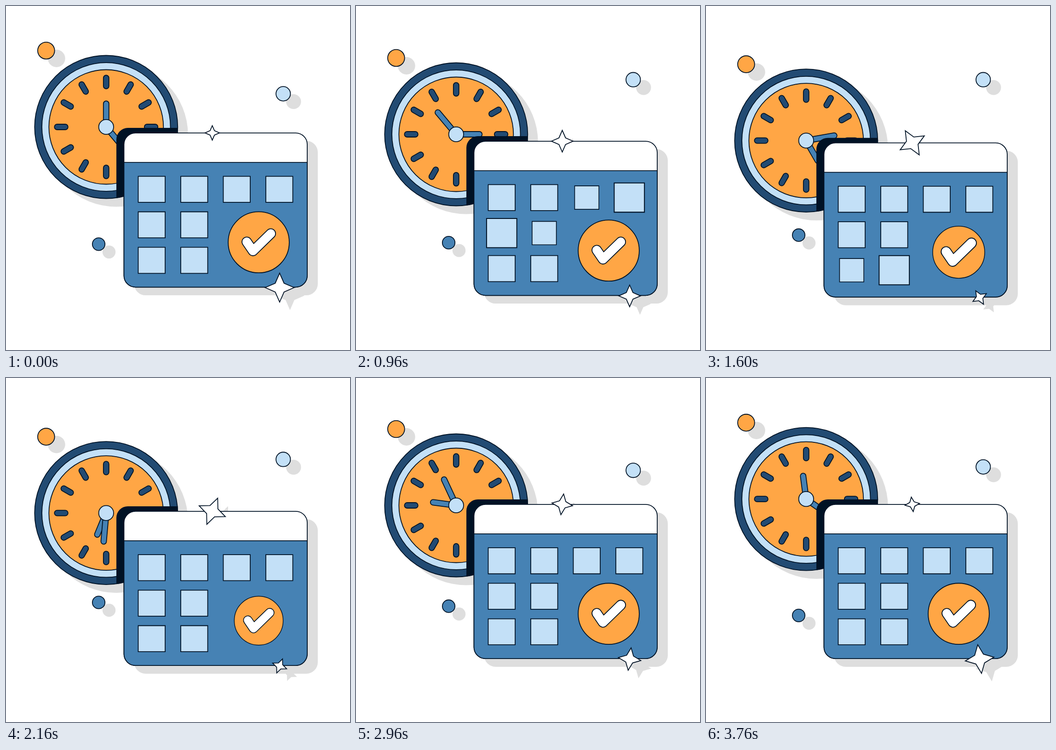
Write an HTML page with a canvas that moves like this. It is 748x748 px and loops after 3840 ms.

```html
<!DOCTYPE html>
<html lang="en">
<head>
<meta charset="utf-8">
<title>Clock and calendar</title>
<style>
  html, body { margin: 0; width: 100%; height: 100%; overflow: hidden; background: #fff; }
  canvas { display: block; }
</style>
</head>
<body>
<canvas id="stage" width="748" height="748"></canvas>
<script>
const ctx = document.getElementById('stage').getContext('2d');
const LOOP = 3840, STEP = 80, TAU = Math.PI * 2;
const INK = '#001225', NAVY = '#224b73', BLUE = '#4682b4', SKY = '#c3e0f7',
      ORANGE = '#ffa645', SHADOW = '#dedede', WHITE = '#fff';
const SHADOW_X = 22.5, SHADOW_Y = 17.5;

const smooth = u => u * u * (3 - 2 * u);

// Eased swing 0..1..0 over one loop, highest at the given time
function swing(t, peak) {
  const phase = (t - peak + LOOP) % LOOP;
  return smooth(Math.abs(phase - LOOP / 2) / (LOOP / 2));
}

// Eased value between [time, value] keys
function keyed(t, keys) {
  if (t <= keys[0][0]) return keys[0][1];
  for (let i = 1; i < keys.length; i++) {
    const [t0, v0] = keys[i - 1], [t1, v1] = keys[i];
    if (t < t1) return v0 + (v1 - v0) * smooth((t - t0) / (t1 - t0));
  }
  return keys[keys.length - 1][1];
}

const TILE_POP = [[0, 1], [160, 0.9], [400, 1.2], [640, 0.9], [800, 1]];
const BADGE_POP = [[1440, 1], [1680, 0.8], [1920, 1.2], [2160, 0.8], [2400, 1]];
const CHECK_POP = [[1440, 1], [1760, 1.1], [2160, 0.91], [2400, 1]];

function paint(fill, outlined = true) {
  ctx.fillStyle = fill;
  ctx.fill();
  if (!outlined) return;
  ctx.strokeStyle = INK;
  ctx.lineWidth = 1.8;
  ctx.stroke();
}

function circle(x, y, r, fill, outlined) {
  ctx.beginPath();
  ctx.arc(x, y, r, 0, TAU);
  paint(fill, outlined);
}

function box(x, y, w, h, radius, fill, outlined) {
  ctx.beginPath();
  ctx.roundRect(x, y, w, h, radius);
  paint(fill, outlined);
}

function star(x, y, r, turn, fill, outlined) {
  ctx.beginPath();
  for (let i = 0; i < 8; i++) {
    const d = i % 2 ? r * 0.43 : r, a = turn + i * TAU / 8;
    ctx.lineTo(x + d * Math.sin(a), y - d * Math.cos(a));
  }
  ctx.closePath();
  paint(fill, outlined);
}

function at(x, y, turn, scale, draw) {
  ctx.save();
  ctx.translate(x, y);
  ctx.rotate(turn);
  ctx.scale(scale, scale);
  draw();
  ctx.restore();
}

function dot(x, y, r, fill) {
  circle(x + SHADOW_X, y + SHADOW_Y - 0.5, r + 0.5, SHADOW, false);
  circle(x, y, r, fill);
}

function clock(x, y, t, calendarY) {
  circle(x, y, 155.5, NAVY);
  circle(x, y, 139.8, SKY);
  circle(x, y, 124.5, ORANGE);
  for (let i = 0; i < 12; i++)
    at(x, y, i * TAU / 12, 1, () => box(-6, -112.5, 12, 29.5, 6, NAVY));

  const turn = t / LOOP * TAU;
  const hand = (angle, length) =>
    at(x, y, angle, 1, () => box(-6, -length, 12, length, 6, BLUE));
  hand(turn, 56.5);
  hand(turn * 2 + 140 * TAU / 360, 68);
  circle(x, y, 16.2, SKY);

  // Dark gap where the calendar overlaps the dial
  ctx.save();
  ctx.beginPath();
  ctx.arc(x, y, 156.4, 0, TAU);
  ctx.clip();
  box(240, calendarY - 11, 420, 360, 25, INK, false);
  ctx.restore();
}

function checkMark() {
  ctx.beginPath();
  ctx.moveTo(-26, -1);
  ctx.lineTo(-12.5, 18.8);
  ctx.lineTo(26.3, -19);
  ctx.lineCap = ctx.lineJoin = 'round';
  for (const [color, width] of [[INK, 22.6], [WHITE, 19]]) {
    ctx.strokeStyle = color;
    ctx.lineWidth = width;
    ctx.stroke();
  }
  ctx.lineCap = 'butt';
  ctx.lineJoin = 'miter';
}

function calendar(y, t) {
  box(256.5, y, 398.5, 335.2, 25, WHITE);
  box(256.5, y + 64, 398.5, 271.2, [0, 0, 25, 25], BLUE);

  for (let i = 0; i < 8; i++) {
    const row = i < 4 ? 0 : i < 6 ? 1 : 2;
    const col = i < 4 ? i : i % 2;
    const scale = keyed(t - i * 160, TILE_POP);
    at(316.8 + col * 92.5, y + 122.5 + row * 77.2, 0, scale,
      () => box(-29.3, -28.3, 58.6, 56.6, 0, SKY));
  }

  at(549.5, y + 237.7, 0, keyed(t, BADGE_POP), () => circle(0, 0, 66.4, ORANGE));
  at(549.5, y + 237.7, 0, keyed(t, CHECK_POP), checkMark);
}

function draw(t) {
  ctx.fillStyle = WHITE;
  ctx.fillRect(0, 0, 748, 748);

  const lift = 32 * swing(t, 1920);
  const clockX = 217.8, clockY = 263 + lift;
  const calendarY = 272 + 26.2 * swing(t, 1440);
  const turn = t / LOOP * TAU, grow = swing(t, 1920);
  const stars = [
    [448.5, calendarY - 0.2, 15.75 * (1 + grow)],
    [595, calendarY + 336.2, 15.75 * (2 - grow)]
  ];

  circle(clockX + SHADOW_X - 0.5, clockY + SHADOW_Y, 156, SHADOW, false);
  clock(clockX, clockY, t, calendarY);

  box(256 + SHADOW_X, calendarY + SHADOW_Y - 0.5, 399.5, 336, 25, SHADOW, false);
  for (const [x, y, r] of stars)
    star(x + SHADOW_X, y + SHADOW_Y, r, turn, SHADOW, false);

  calendar(calendarY, t);
  for (const [x, y, r] of stars) star(x, y, r, turn, WHITE);

  dot(87.3, 97 + lift, 18.4, ORANGE);
  dot(602.8, 156.8 + 46 * swing(t, 3200), 15.7, SKY);
  dot(201.5, 487.3 + 34.4 * swing(t, 400), 13.7, BLUE);
}

const start = performance.now();
function frame() {
  // The picture advances in fixed steps; the small lead absorbs timer jitter
  const elapsed = performance.now() - start + 8;
  draw(Math.floor(elapsed / STEP) * STEP % LOOP);
  requestAnimationFrame(frame);
}
frame();
</script>
</body>
</html>
```
